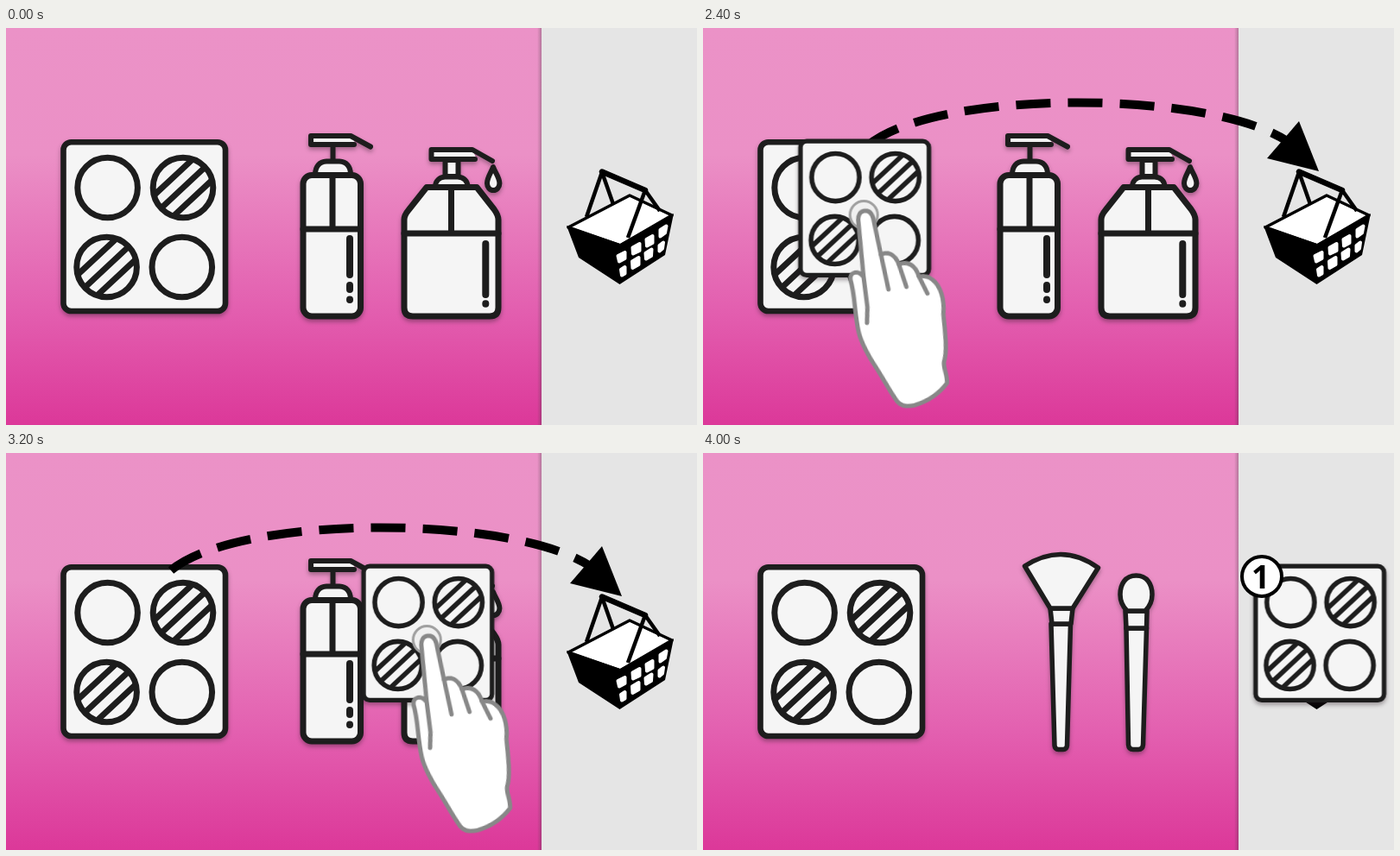
Write an HTML page that moves like this. It is 800 px wide and 460 px high and loops after 6000 ms.

```html
<!DOCTYPE html>
<html lang="en">
<head>
<meta charset="utf-8">
<title>Drag to basket</title>
<style>
html, body { margin: 0; width: 100%; height: 100%; overflow: hidden; }
svg { display: block; width: 100vw; height: 100vh; }

.ink { fill: #f5f5f5; stroke: #1d1d1d; stroke-linejoin: round; stroke-linecap: round; }
.line { fill: none; }
.shade { filter: drop-shadow(0 3px 2.5px rgba(40, 25, 35, .38)); }
.hand { fill: #fff; stroke: #888; stroke-width: 5; stroke-linejoin: round; stroke-linecap: round; }

/* 6 s loop, 1 s = 16.66% */
.products, .brushes, .arrow, .copy, .pointer, .press, .badge {
  animation: 6s step-end infinite;
}
.products { animation-name: products; }
.brushes, .badge { animation-name: dropped; }
.arrow { animation-name: arrow; }
.copy { animation-name: copy; }
.pointer { animation-name: pointer; }
.press { animation-name: press; }
.drag { animation: drag 6s linear infinite; }
.tilt { animation: tilt 6s linear infinite; transform-origin: 149px 213px; }

@keyframes products { 0% { opacity: 1 } 66.66%, 100% { opacity: 0 } }
@keyframes dropped { 0% { opacity: 0 } 66.66%, 100% { opacity: 1 } }
@keyframes arrow { 0% { opacity: 0 } 16.66% { opacity: 1 } 66.66%, 100% { opacity: 0 } }
@keyframes copy { 0% { opacity: 0 } 38.33%, 100% { opacity: 1 } }
@keyframes pointer { 0% { opacity: 0 } 33.33% { opacity: 1 } 66.66%, 100% { opacity: 0 } }
@keyframes press { 0% { opacity: 0 } 36.66% { opacity: 1 } 66.66%, 100% { opacity: 0 } }
@keyframes drag {
  0% { transform: translateX(0) }
  38.33% { transform: translateX(0); animation-timing-function: steps(15, end) }
  63.33%, 100% { transform: translateX(564.6px) }
}
@keyframes tilt {
  0% { transform: translate(0, 0) rotate(0deg) }
  33.33% { transform: translate(0, 0) rotate(0deg); animation-timing-function: steps(3, end) }
  38.33%, 100% { transform: translate(-1px, -2px) rotate(-8deg) }
}
</style>
</head>
<body>
<svg viewBox="0 0 800 460" preserveAspectRatio="none">
  <defs>
    <linearGradient id="pink" x2="0" y2="1">
      <stop offset="0" stop-color="#eb92c7"/>
      <stop offset=".32" stop-color="#eb90c6"/>
      <stop offset=".7" stop-color="#e360b0"/>
      <stop offset="1" stop-color="#dc3899"/>
    </linearGradient>
    <linearGradient id="edge">
      <stop offset="0" stop-color="#333" stop-opacity="0"/>
      <stop offset="1" stop-color="#333" stop-opacity=".3"/>
    </linearGradient>
    <g id="striped">
      <circle r="34.8"/>
      <path class="line" transform="rotate(-43)" stroke-linecap="butt"
        d="M-30-16.500H30M-34 0H34M-30 16.500H30"/>
    </g>
    <g id="palette" class="ink" stroke-width="6.6">
      <rect x="66.5" y="132.2" width="187.5" height="195.8" rx="9"/>
      <g stroke-width="7">
        <circle cx="117.6" cy="185" r="34.8"/>
        <use href="#striped" x="205" y="185"/>
        <use href="#striped" x="116.6" y="277"/>
        <circle cx="203.8" cy="277" r="34.8"/>
      </g>
    </g>
  </defs>

  <rect width="800" height="460" fill="url(#pink)"/>
  <rect x="615" width="5" height="460" fill="url(#edge)"/>
  <rect x="620" width="180" height="460" fill="#e5e5e5"/>

  <use href="#palette" class="shade"/>

  <g class="products">
    <g class="ink shade" stroke-width="7">
      <path stroke-width="6" d="M378.500 137V153"/>
      <path stroke-width="6" d="M358 170C358 160 363 155 371 154.500H386C394 155 399 160 399 170Z"/>
      <rect x="344" y="170.500" width="66.500" height="163.500" rx="10"/>
      <path class="line" d="M344 233H410M378 171V233"/>
      <path class="line" stroke-width="8" d="M398 244V286M398 298V303M398 314.500V315"/>
      <path stroke="none" d="M353 125H400L405 135H353Z"/>
      <path class="line" stroke-width="6" d="M422 137.500L399 125H353V135H403"/>
    </g>
    <g class="ink shade" stroke-width="7">
      <path stroke-width="6" d="M508.500 153H523.500V172H508.500Z"/>
      <path stroke-width="6" d="M497 184C497 177 502 173 508 172.500H523C530 173 534.500 177 534.500 184Z"/>
      <path d="M487 184.500H545L565 210Q570 217 570 222V324Q570 334 560 334H471Q461 334 461 324V222Q461 217 466 211Z"/>
      <path class="line" d="M461 238H570M515.500 185V238"/>
      <path class="line" stroke-width="8" d="M555.300 250V309M555.300 319.300V319.800"/>
      <path stroke="none" d="M492 141H540L545 152H492Z"/>
      <path class="line" stroke-width="6" d="M563 154L540 141H492.500V152H543"/>
      <path stroke-width="6" d="M564 161C562 167 557 173 557 180A7.200 8 0 0 0 571.400 180C571.400 173 566 167 564 161Z"/>
    </g>
  </g>

  <g class="brushes">
    <g class="ink shade" stroke-width="5.500">
      <path d="M403 198H425.500L421.500 339Q421 343.500 417 343.500H411.500Q407.500 343.500 407 339Z"/>
      <path d="M402 180H428L426 198H404Z"/>
      <path d="M372.500 131Q416 103 457.500 133L428 180H402Z"/>
      <path d="M490 203H513.500L509.500 338Q509 343.500 504 343.500H498Q493 343.500 492.500 338Z"/>
      <path d="M489 183H514L513.500 203H490Z"/>
      <path d="M501.500 142C514 142 520 152 520 164C520 172 516 179 512 183H491C487 179 483 172 483 164C483 152 489 142 501.500 142Z"/>
    </g>
  </g>

  <g class="arrow">
    <path d="M191 136C270 70 586 71.500 676 131" fill="none" stroke="#000" stroke-width="10" stroke-dasharray="40 20"/>
    <path d="M690 108L653 151L713 166Z"/>
  </g>

  <g stroke-linejoin="round">
    <path d="M651 231L722 194L771 217L711 252Z" fill="#fff" stroke="#000" stroke-width="3.500"/>
    <path d="M649 229L711 250L773 215L763 263L710.500 297L663 266Z"/>
    <g fill="#fff" stroke="#fff" stroke-width="4">
      <path d="M708.500 264L716.500 260V267L710 270.500Z"/>
      <path d="M725.500 254.500L733.500 250V258L726 261.500Z"/>
      <path d="M741.500 245L748.500 241V249L742 252.500Z"/>
      <path d="M757.500 234L764.500 229.500L763 237.500L757.500 241.500Z"/>
      <path d="M712 280L716.500 277V284.500L713 286.500Z"/>
      <path d="M725 270.500L732.500 266V274L725.500 278Z"/>
      <path d="M740.500 261L747.500 256.500L747 264L741 267.500Z"/>
      <path d="M756.500 252L761 248.500L760 255.500L756.500 258.500Z"/>
    </g>
    <g fill="none" stroke="#000">
      <path stroke-width="4.500" d="M672 219L690 167L703 204M757 212L740 188L720 243"/>
      <path stroke-width="6.500" stroke-linecap="round" d="M690 166.500L740 188"/>
    </g>
  </g>

  <g class="copy">
    <g class="drag">
      <g class="shade">
        <use href="#palette" transform="translate(72.4 128.6) scale(.793) translate(-63 -129)"/>
      </g>
    </g>
  </g>

  <g class="badge">
    <circle cx="647" cy="143" r="23" fill="#fff" stroke="#000" stroke-width="4"/>
    <text x="645.500" y="156.500" text-anchor="middle" font-family="'Open Sans', sans-serif" font-weight="700" font-size="37">1</text>
  </g>

  <g class="pointer">
    <g class="drag">
      <circle class="press" cx="148.500" cy="216.500" r="16" fill="#f0f0f0" stroke="#a0a0a0" stroke-width="3"/>
      <g class="tilt">
        <g class="hand">
          <path d="M150 214C145 214 142 218 141.500 224L138.500 290C133 280 123 282 123 291C126 310 122 330 124 352C125 365 133 385 137 393C145 410 150 425 157 438C161 445 168 446 177 445C190 443 205 437 217 425C219 415 215 408 217 400C223 388 223 365 224 345C228 328 225 312 217 304C212 298 206 298 202 298C200 285 192 278 181 281C178 268 170 264 162 267L159 224C158 217 155 214 150 214Z"/>
          <path fill="none" d="M138.500 290L138 325L135 343M162 267L165 308M181 281L186 308M202 298L209 319"/>
        </g>
      </g>
    </g>
  </g>
</svg>
</body>
</html>
```
